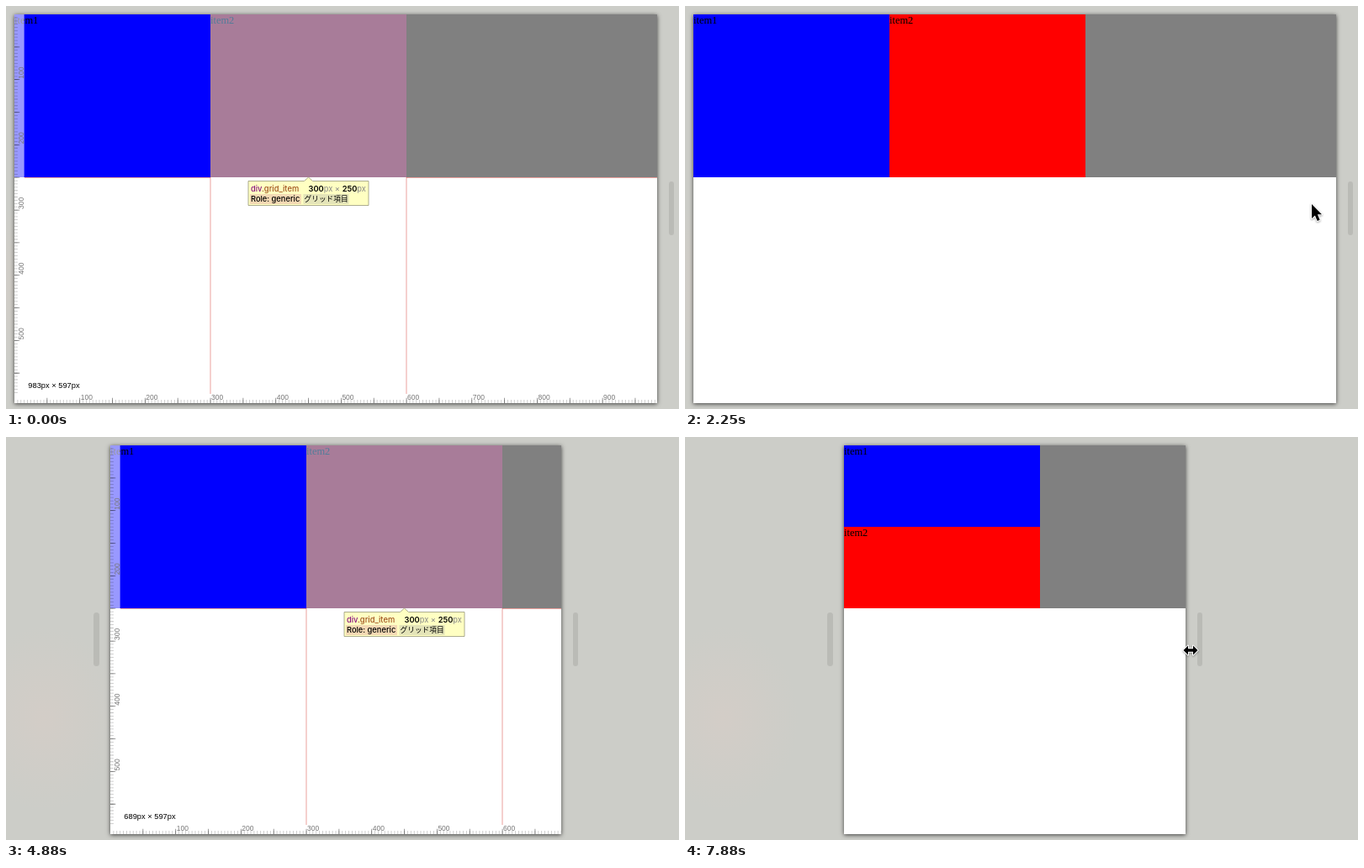
An HTML page that plays this animation: 800 px wide and 480 px high, repeating every 8000 ms.

```html
<!DOCTYPE html>
<html lang="en">
<head>
<meta charset="utf-8">
<title>Responsive grid demo</title>
<style>
html, body { margin: 0; width: 100%; height: 100%; overflow: hidden; }
body {
  position: relative;
  background: radial-gradient(90px 110px at 45px 335px, #d3cdc7, #d3cdc700) #cccdc8;
}
.center { position: absolute; left: 0; top: 10px; width: 784px; display: flex; justify-content: center; }
.panel {
  position: relative; flex: none; width: 764px; height: 463px;
  background: #fff; box-shadow: 0 1px 5px rgba(0, 0, 0, .7);
  container-type: inline-size;
}
.panel::before, .panel::after {
  content: ""; position: absolute; top: 199px; width: 6.5px; height: 64px;
  border-radius: 4px; background: rgba(0, 0, 0, .085);
}
.panel::before { left: -20px; }
.panel::after { right: -20px; }

.grid {
  display: grid; height: 194px;
  grid-template-columns: 233px 233px 1fr;
  font: 12.43px/14px "Liberation Serif", serif;
}
.one { background: #00f; }
.two { background: #f00; }
.three { background: #808080; }
.slim { display: none; }
@container (max-width: 600px) {
  .wide { display: none; }
  .slim { display: inline; }
}
@container (max-width: 466px) {
  .grid { grid-template: 97px 97px / 233px 1fr; }
  .two { grid-area: 2 / 1; }
  .three { grid-area: 1 / 2 / 3; }
}

.overlay { position: absolute; left: 0; top: 0; width: 100%; height: 100%; overflow: hidden; }
.overlay svg { overflow: visible; }
.fill { fill: rgba(111, 168, 220, .66); }
.fill-red { fill: rgba(123, 189, 233, .66); }
.guide { stroke: rgba(215, 60, 50, .48); fill: none; }
.sub { stroke: rgba(0, 0, 0, .25); stroke-width: 3.9; stroke-dasharray: .78 3.104; }
.step { stroke: rgba(0, 0, 0, .5); stroke-width: 6.2; stroke-dasharray: .78 38.06; }
.labels { font: 8.5px "Liberation Sans", sans-serif; fill: #777; }
.size { font: 9.3px "Liberation Sans", sans-serif; }
.tip { font: 500 9.3px Inter, "Noto Sans CJK JP", sans-serif; }
.tip path { fill: #ffffc2; stroke: #99997a; stroke-width: .8; }
.tag { fill: #881280; }
.cls { fill: #a0501c; }
.num { font-weight: 600; fill: #000; }
.unit { font-weight: 400; fill: #888; }

.cursor { position: absolute; left: 0; top: 0; overflow: visible; filter: drop-shadow(0 1px 1px rgba(0, 0, 0, .35)); }
.cursor path { stroke: #fff; stroke-width: 2; paint-order: stroke; stroke-linejoin: round; }

/* The motion runs on a clock of 64 ticks, 1.5625% each. */
.panel, .overlay, .item, .page, .html, .body, .cursor {
  animation: 8s step-end -15ms infinite;
}
.panel { animation-name: resize; }
.overlay { animation-name: inspect; }
.item { animation-name: item; }
.page { animation-name: page; }
.html { animation-name: html; }
.body { animation-name: body; }
.arrow { animation-name: arrow; }
.drag { animation-name: drag; }

@keyframes resize {
  0% { width: 764px; }
  35.9375% { width: 761px; }
  37.5% { width: 736px; }
  39.0625% { width: 716px; animation-timing-function: steps(4); }
  45.3125% { width: 566px; }
  46.875% { width: 548px; }
  48.4375% { width: 536px; }
  90.625% { width: 530px; }
  92.1875% { width: 512px; animation-timing-function: steps(4); }
  98.4375%, 100% { width: 406px; }
}
@keyframes inspect {
  0%, 57.8125% { visibility: visible; }
  23.4375%, 84.375%, 100% { visibility: hidden; }
}
@keyframes item {
  0%, 60.9375% { opacity: 1; }
  20.3125%, 81.25%, 100% { opacity: 0; }
}
@keyframes page {
  0%, 60.9375% { opacity: 0; }
  20.3125%, 81.25%, 100% { opacity: 1; }
}
@keyframes html {
  0%, 23.4375%, 59.375%, 84.375%, 100% { opacity: 0; }
  21.875%, 57.8125%, 82.8125% { opacity: 1; }
}
@keyframes body {
  0%, 21.875%, 60.9375%, 82.8125%, 100% { opacity: 0; }
  20.3125%, 59.375%, 81.25% { opacity: 1; }
}
@keyframes arrow {
  0%, 29.6875%, 56.25%, 87.5%, 100% { transform: translate(-99px, -99px); }
  21.875% { transform: translate(370px, 375px); animation-timing-function: steps(3); }
  26.5625% { transform: translate(680px, 262px); }
  28.125% { transform: translate(745px, 236px); }
  51.5625% { transform: translate(640px, 280px); animation-timing-function: steps(2); }
  54.6875% { transform: translate(530px, 440px); }
  81.25% { transform: translate(429px, 364px); animation-timing-function: steps(3); }
  85.9375% { transform: translate(655px, 253px); }
}
@keyframes drag {
  0%, 51.5625% { transform: translate(-99px, -99px); }
  29.6875% { transform: translate(775px, 226px); }
  31.25% { transform: translate(784px, 222px); }
  35.9375% { transform: translate(780px, 222px); }
  37.5% { transform: translate(767px, 224px); }
  39.0625% { transform: translate(754px, 226px); animation-timing-function: steps(4); }
  45.3125% { transform: translate(681px, 237px); }
  46.875% { transform: translate(672px, 238px); }
  48.4375% { transform: translate(668px, 239px); }
  87.5% { transform: translate(676px, 246px); }
  90.625% { transform: translate(673px, 246px); }
  92.1875% { transform: translate(662px, 247px); animation-timing-function: steps(4); }
  98.4375%, 100% { transform: translate(601px, 254px); }
}
</style>
</head>
<body>
<div class="center">
  <div class="panel">
    <div class="grid">
      <div class="one">item1</div>
      <div class="two">item2</div>
      <div class="three"></div>
    </div>
    <svg class="overlay">
      <rect class="fill-red" x="233" width="233" height="194"/>
      <g class="page">
        <rect class="fill" width="233" height="194"/>
        <rect class="fill" x="466" width="100%" height="194"/>
        <path class="guide" d="M.5 194V452"/>
        <svg x="100%"><path class="guide" d="M-.5 194V452"/></svg>
      </g>
      <path class="guide item" d="M12 194.5H233M466 194.5H800M233 194V452M466 194V452"/>

      <rect width="11.65" height="452" fill="#fff" fill-opacity=".6"/>
      <path class="sub" d="M1.95 3.5V452M3.5 461.05H800"/>
      <path class="step" d="M3.1 38.45V452M38.45 459.9H800"/>
      <g class="labels" id="labels"></g>
      <g class="size">
        <text class="wide" x="16.3" y="444.5">983px × 597px</text>
        <text class="slim" x="16.3" y="444.5">689px × 597px</text>
      </g>

      <g class="tip item" id="itemTip">
        <svg x="349.5">
          <path d="M-71.5 198.5H-5L0 194L5 198.5H71.5V227.5H-71.5Z"/>
          <rect x="-69.5" y="214" width="61" height="12" fill="#f3d9b4"/>
          <rect x="-6" y="214" width="54" height="12" fill="#e4e4b8"/>
          <text class="tag" x="-68.5" y="210.7">div<tspan class="cls">.grid_item</tspan></text>
          <text class="dims" x="0" y="210.7" data-w="300"></text>
          <text x="-68.5" y="222.7">Role: generic</text>
          <text x="-5" y="222.7" font-size="8.7">グリッド項目</text>
        </svg>
      </g>
      <g class="tip page">
        <svg x="50%">
          <g class="html">
            <path d="M-52.5 198.5H-5L0 194L5 198.5H51.5V215.5H-52.5Z"/>
            <text class="tag" x="-49.5" y="210.7">html</text>
            <text class="dims wide" x="-20" y="210.7" data-w="983"></text>
            <text class="dims slim" x="-20" y="210.7" data-w="689"></text>
          </g>
          <g class="body">
            <path d="M-53.5 198.5H-5L0 194L5 198.5H53V215.5H-53.5Z"/>
            <text class="tag" x="-50.7" y="210.7">body</text>
            <text class="dims wide" x="-18.7" y="210.7" data-w="983"></text>
            <text class="dims slim" x="-18.7" y="210.7" data-w="689"></text>
          </g>
        </svg>
      </g>
    </svg>
  </div>
</div>
<svg class="cursor arrow" width="1" height="1"><path d="M0 0V17L3.9 13.4L6.7 20L9.6 18.8L6.9 12.3H12Z"/></svg>
<svg class="cursor drag" width="1" height="1"><path d="M-8.5 0L-3 -5.5V-1.8H3V-5.5L8.5 0L3 5.5V1.8H-3V5.5Z"/></svg>
<script>
const scale = 0.7768;
let labels = "";
for (let px = 100; px <= 900; px += 100) {
  const pos = px * scale;
  labels += `<text x="${pos + 1}" y="459">${px}</text>`;
  if (px <= 500) labels += `<text transform="translate(10.5 ${pos - 1}) rotate(-90)">${px}</text>`;
}
document.getElementById("labels").innerHTML = labels;

const length = n => `<tspan class="num">${n}</tspan><tspan class="unit">px</tspan>`;
for (const el of document.querySelectorAll(".dims")) {
  el.innerHTML = `${length(el.dataset.w)}<tspan class="unit"> × </tspan>${length(250)}`;
}
</script>
</body>
</html>
```
